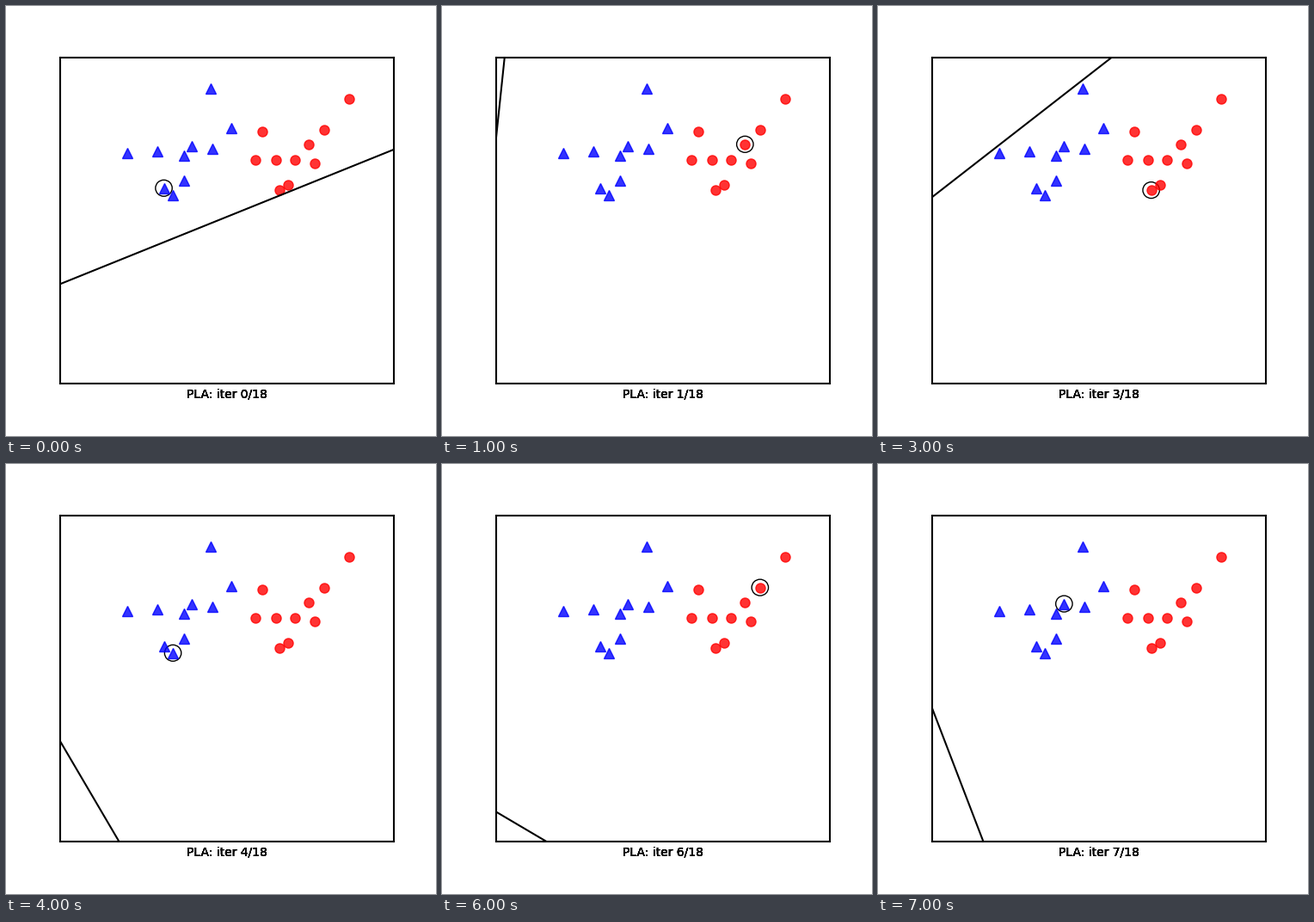
These frames come from a looping animation (500x500 px, 8000 ms). A matplotlib script:

```python
import numpy as np
import matplotlib.pyplot as plt
from matplotlib.animation import FuncAnimation

SIZE, DPI = 500, 100
LEFT, RIGHT, TOP, BOTTOM = 63, 451, 60, 439  # plot box in pixels
FRAMES, INTERVAL = 8, 1000
N = 10

rng = np.random.RandomState(2)


def cluster(center):
    """Correlated normal cloud, covariance [[.3, .2], [.2, .3]]."""
    axes = np.array([[-1, -1], [-1, 1]]) / np.sqrt(2)
    spread = np.sqrt([0.5, 0.1])
    return center + (rng.standard_normal((N, 2)) * spread) @ axes


def perceptron(points, labels, w):
    """Return every weight vector and the point that triggered each update."""
    weights, missed = [w], []
    while np.any(np.sign(points @ weights[-1]) != labels):
        for k in rng.permutation(len(points)):
            if np.sign(points[k] @ weights[-1]) != labels[k]:
                missed.append(k)
                weights.append(weights[-1] + labels[k] * points[k])
    return weights, missed


blue, red = cluster([2, 2]), cluster([4, 2])
points = np.column_stack([np.ones(2 * N), np.vstack([blue, red])])
labels = np.repeat([1, -1], N)
weights, missed = perceptron(points, labels, rng.standard_normal(3))
total = len(missed)

fig = plt.figure(figsize=(SIZE / DPI, SIZE / DPI), dpi=DPI, facecolor="white")
ax = fig.add_axes([LEFT / SIZE, 1 - BOTTOM / SIZE,
                   (RIGHT - LEFT) / SIZE, (BOTTOM - TOP) / SIZE])
ax.set(xlim=(0, 6), ylim=(-2, 4), xticks=[], yticks=[])
for spine in ax.spines.values():
    spine.set_linewidth(1.5)

ax.plot(*blue.T, "b^", markersize=8, alpha=0.8)
ax.plot(*red.T, "ro", markersize=8, alpha=0.8)
boundary, = ax.plot([], [], "k", linewidth=1.5)
ring = plt.Circle((0, 0), 0.15, color="k", fill=False, linewidth=1)
ax.add_patch(ring)

# Stacked copies give the caption its heavy edges.
captions = [ax.annotate("", (0.5, 0), (0, -4), xycoords="axes fraction",
                        textcoords="offset points", ha="center", va="top",
                        fontsize=10, family="DejaVu Sans")
            for _ in range(6)]


def update(i):
    w0, w1, w2 = weights[i]
    x = np.array([-100, 100])
    boundary.set_data(x, -(w0 + w1 * x) / w2)
    ring.center = points[missed[i], 1:]
    for caption in captions:
        caption.set_text(f"PLA: iter {i}/{total}")
    return [boundary, ring, *captions]


anim = FuncAnimation(fig, update, frames=FRAMES, interval=INTERVAL, repeat=True)
plt.show()
```
